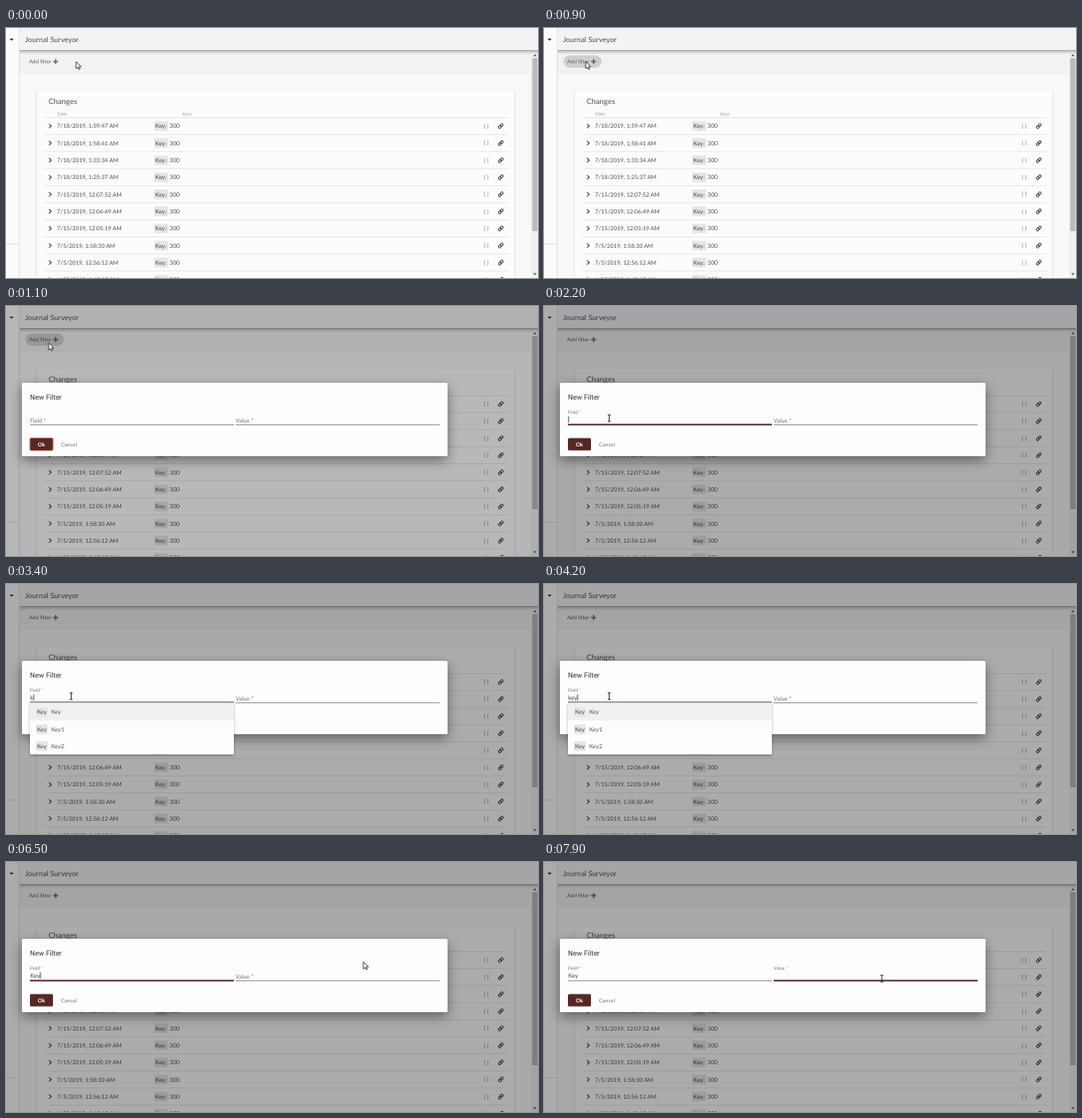
Write an HTML page that moves like this. It is 600 by 283 pixels and loops after 8 s.

```html
<!DOCTYPE html>
<html lang="en">
<head>
<meta charset="utf-8">
<title>New filter dialog</title>
<style>
  html, body { margin: 0; width: 100%; height: 100%; overflow: hidden; background: #f9f8fa; }
  svg { display: block; width: 100%; height: 100%; font-family: Lato, "Open Sans", sans-serif; }
  text { white-space: pre; text-rendering: geometricPrecision; }
</style>
</head>
<body>
<svg id="stage" viewBox="0 0 600 283">
  <defs>
    <linearGradient id="fall" x1="0" y1="0" x2="0" y2="1">
      <stop offset="0" stop-color="#000" stop-opacity=".42"/>
      <stop offset=".3" stop-color="#000" stop-opacity=".16"/>
      <stop offset="1" stop-color="#000" stop-opacity="0"/>
    </linearGradient>
    <filter id="cardShadow" x="-5%" y="-5%" width="110%" height="110%">
      <feDropShadow dx="0" dy="1" stdDeviation="1.5" flood-opacity=".16"/>
    </filter>
    <filter id="dialogShadow" x="-10%" y="-40%" width="120%" height="200%">
      <feDropShadow dx="0" dy="5" stdDeviation="7" flood-opacity=".42"/>
    </filter>
    <filter id="panelShadow" x="-10%" y="-20%" width="120%" height="150%">
      <feDropShadow dx="0" dy="1.5" stdDeviation="1.5" flood-opacity=".3"/>
    </filter>
  </defs>
</svg>
<script>
const LOOP = 8000, STEP = 100;
const svg = document.getElementById('stage');

function add(parent, tag, attrs, content) {
  const el = document.createElementNS('http://www.w3.org/2000/svg', tag);
  set(el, attrs);
  if (content !== undefined) el.textContent = content;
  return parent.appendChild(el);
}
function set(el, attrs) {
  for (const name in attrs) el.setAttribute(name, attrs[name]);
}
const group = (parent, attrs = {}) => add(parent, 'g', attrs);
const rect = (parent, x, y, width, height, fill, more = {}) =>
  add(parent, 'rect', { x, y, width, height, fill, ...more });
const label = (parent, x, y, size, content, fill = '#505050', more = {}) =>
  add(parent, 'text', { x, y, 'font-size': size, fill, ...more }, content);
const stroke = (parent, d, color, width = 1) =>
  add(parent, 'path', { d, stroke: color, 'stroke-width': width, fill: 'none' });
const show = (el, on) => set(el, { opacity: on ? 1 : 0 });

const clamp = v => Math.min(1, Math.max(0, v));
const easeOut = v => 1 - (1 - clamp(v)) ** 3;
const mix = (a, b, p) => a + (b - a) * p;

// Last entry of [time, ...] whose time has come.
const latest = (table, t) => table.filter(row => row[0] <= t).pop();

// Page
rect(svg, 0, 0, 600, 283, '#f9f8fa');
rect(svg, 15, 26, 577, 26, '#f2f1f3');

const pill = rect(svg, 22, 31, 43, 14, '#dddcde', { rx: 7 });
label(svg, 26, 40.2, 6.15, 'Add filter', '#666');
stroke(svg, 'M53 38h6M56 35v6', '#444', 1.1);

rect(svg, 35, 71, 538, 230, '#fdfcfd', { rx: 2, filter: 'url(#cardShadow)' });
label(svg, 48, 86, 8.6, 'Changes');
label(svg, 58, 99, 5, 'Date', '#999');
label(svg, 199, 99, 5, 'Keys', '#999');
stroke(svg, 'M43 101.5H567', '#e8e8e8');

const dates = [
  '7/18/2019, 1:59:47', '7/18/2019, 1:58:41', '7/18/2019, 1:33:34', '7/18/2019, 1:25:37',
  '7/15/2019, 12:07:52', '7/15/2019, 12:06:49', '7/15/2019, 12:05:19',
  '7/5/2019, 1:58:30', '7/5/2019, 12:56:12', '6/28/2019, 1:48:15'
];
dates.forEach((date, i) => {
  const row = group(svg, { transform: `translate(0 ${111 + 19.32 * i})` });
  stroke(row, 'M48.5 -2.4L51 0L48.5 2.4', '#444', 1.1);
  label(row, 57.5, 2.4, 6.5, date + ' AM');
  rect(row, 167, -5.5, 16, 11, '#e4e7e9', { rx: 1 });
  label(row, 168.3, 2.4, 6.6, 'Key:', '#444');
  label(row, 184.3, 2.4, 6.7, '300');
  label(row, 539, 2, 6, '{ }', '#777');
  const link = group(row, { transform: 'translate(558 0) rotate(-45)' });
  for (const x of [-3.2, -.3])
    rect(link, x, -1.3, 3.5, 2.6, 'none', { rx: 1.3, stroke: '#444', 'stroke-width': 1 });
  stroke(row, 'M43 9.6H567', '#e8e8e8');
});

rect(svg, 592, 26, 8, 257, '#f1f0f1');
rect(svg, 593.5, 34, 6, 196, '#bbb');
add(svg, 'path', { d: 'M594.5 32l2-2.5l2 2.5zM594.5 277.500l2 2.5l2-2.5z', fill: '#666' });

rect(svg, 0, 0, 15, 283, '#fcfbfc');
stroke(svg, 'M15 0V283', '#dddcde');
stroke(svg, 'M0 244.500H15', '#e2e2e2');
add(svg, 'path', { d: 'M4 12h4.600l-2.300 2.600z', fill: '#333' });
rect(svg, 15.5, 0, 584.5, 25, '#f3f2f4');
rect(svg, 15.5, 25, 584.5, 5, 'url(#fall)');
label(svg, 21.5, 15.7, 8.25, 'Journal Surveyor');

const backdrop = rect(svg, 0, 0, 600, 283, '#000');

// Dialog
const dialog = group(svg);
rect(dialog, 18, 87, 480, 83, '#fefdfe', { rx: 1.5, filter: 'url(#dialogShadow)' });
label(dialog, 27, 105.8, 8, 'New Filter', '#333', { 'font-family': 'Roboto, sans-serif' });

function makeField(x, width, name) {
  stroke(dialog, `M${x} 134.5H${x + width}`, '#999');
  const caption = label(dialog, x, 0, 6.5, name + ' ', '#777');
  const star = add(caption, 'tspan', {}, '*');
  const bar = rect(dialog, x, 133.4, width, 1.8, '#552825');
  const value = label(dialog, x + .3, 131, 6.7, '', '#444');
  const caret = rect(dialog, x, 125, .8, 7, '#333');
  return function draw(t, focusAt, blurAt, content, blinkFrom) {
    const focused = t >= focusAt && t < blurAt;
    const lift = easeOut((t - focusAt + STEP) / 300);
    set(caption, { y: mix(131.6, 121.6, lift), 'font-size': mix(6.5, 5.2, lift) });
    set(star, { fill: focused ? '#d58a4c' : '#777' });
    const grown = focused ? width * lift : 0;
    set(bar, { x: x + (width - grown) / 2, width: grown });
    value.textContent = content;
    set(caret, { x: x + .4 + (content ? value.getComputedTextLength() : 0) });
    show(caret, focused && (t - blinkFrom) % 1000 < 500);
  };
}
const drawField = makeField(27, 230, 'Field');
const drawValue = makeField(259, 230, 'Value');

const okButton = rect(dialog, 27, 149.5, 26, 14, '#562824', { rx: 1.5 });
label(dialog, 40, 158.8, 6.2, 'Ok', '#fff', { 'text-anchor': 'middle', 'font-weight': 700 });
label(dialog, 62, 158.8, 6.1, 'Cancel', '#777');

// Suggestions
const panel = group(svg);
rect(panel, 27, 134.4, 230, 58.3, '#fefdfe', { rx: 1, filter: 'url(#panelShadow)' });
rect(panel, 27, 134.4, 230, 20, '#f1f0f1');
['Key', 'Key1', 'Key2'].forEach((name, i) => {
  const y = 145 + 19.2 * i;
  rect(panel, 34, y - 5.5, 13, 11, '#e4e7e9', { rx: 1 });
  label(panel, 35, y + 2.4, 6.6, 'Key', '#444');
  label(panel, 51, y + 2.4, 6.6, name);
});

// Pointers
const pointers = { arrow: group(svg), beam: group(svg), hand: group(svg) };
add(pointers.arrow, 'path', {
  d: 'M0 0V8L1.900 6.300L3.200 9L4.500 8.400L3.300 5.800H5.700Z',
  fill: '#fff', stroke: '#222', 'stroke-width': .8
});
stroke(pointers.beam, 'M-1.700 -3.800H1.700M-1.700 3.800H1.700M0 -3.800V3.800', '#222', .9);
add(pointers.hand, 'path', {
  d: 'M-1 -4.500Q0 -5.600 .9 -4.500V-1.200L4.300 -.3Q5.200 0 5 1.200L4.200 5.800H-.6L-3.500 1.700Q-3.600 .3 -1 1.700Z',
  fill: '#fff', stroke: '#222', 'stroke-width': .9, 'stroke-linejoin': 'round'
});

const pointerPath = [
  [0, 79, 38], [100, 77, 38], [700, 47, 38], [1000, 47, 38], [1800, 73.5, 127],
  [4500, 73.5, 127], [5000, 62, 151], [5500, 62, 151], [6200, 405, 109],
  [6500, 403, 113], [6700, 384, 130], [7000, 381, 132], [LOOP, 381, 132]
];
const pointerKinds = [
  [0, 'arrow'], [1800, 'beam'], [4800, 'hand'], [5600, 'arrow'], [6700, 'beam']
];
const typed = [[0, ''], [2900, 'k'], [3700, 'ke'], [4200, 'key'], [5500, 'Key']];
const blinkStarts = [[0], [1900], [2200], [2900], [3200], [3700], [4200], [5500]];

function pointerAt(t) {
  const next = pointerPath.findIndex(key => key[0] > t);
  const [t0, x0, y0] = pointerPath[next - 1], [t1, x1, y1] = pointerPath[next];
  const p = (t - t0) / (t1 - t0), s = p * p * (3 - 2 * p);
  return [mix(x0, x1, s), mix(y0, y1, s)];
}

function draw(t) {
  show(pill, t >= 300 && t < 1400);
  set(pill, { fill: t < 800 ? '#dddcde' : '#cfced0' });

  const opening = t >= 1000;
  set(backdrop, { opacity: opening ? mix(.2, .32, easeOut((t - 1000) / 400)) : 0 });
  const settle = clamp((t - 1000) / 100);
  const scale = mix(.965, 1, settle);
  set(dialog, {
    opacity: opening ? mix(.94, 1, settle) : 0,
    transform: `translate(258 128.5) scale(${scale}) translate(-258 -128.5)`
  });
  set(okButton, {
    fill: t < 1100 ? '#80605f' : '#562824',
    stroke: t < 1900 ? '#b9675c' : 'none'
  });

  drawField(t, 1900, 6900, latest(typed, t)[1], latest(blinkStarts, t)[0]);
  drawValue(t, 6900, LOOP, '', 7200);

  const open = easeOut((t - 2800) / 300) * (1 - clamp((t - 5400) / 200));
  const stretch = t < 5400 ? mix(.8, 1, open) : 1;
  set(panel, {
    opacity: open,
    transform: `translate(0 134.4) scale(1 ${stretch}) translate(0 -134.4)`
  });

  const [x, y] = pointerAt(t);
  const kind = latest(pointerKinds, t)[1];
  for (const name in pointers) show(pointers[name], name === kind);
  set(pointers[kind], { transform: `translate(${x} ${y})` });
}

const start = performance.now();
function tick() {
  const t = (performance.now() - start) % LOOP;
  draw(Math.floor(t / STEP) * STEP);
  requestAnimationFrame(tick);
}
tick();
</script>
</body>
</html>
```
